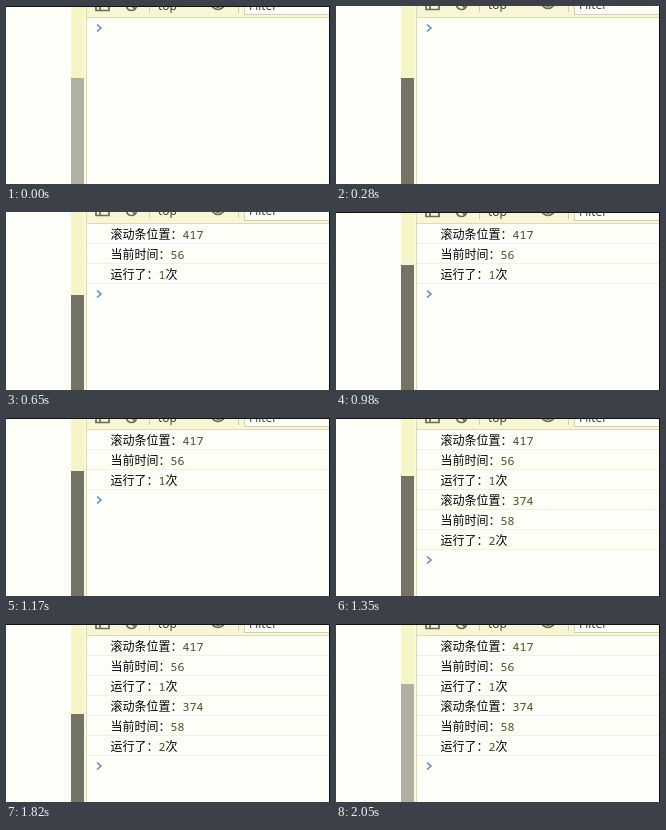
An HTML page for the animation above (2090 ms loop, 324 by 178 pixels).

```html
<!DOCTYPE html>
<html lang="zh-CN">
<head>
<meta charset="utf-8">
<title>Console</title>
<style>
html, body { margin: 0; width: 100%; height: 100%; overflow: hidden; background: #fffffa; }
svg { display: block; width: 324px; height: 178px; }
text { font-family: "Noto Sans CJK SC", "Noto Sans CJK", sans-serif; font-size: 12px; fill: #000; white-space: pre; }
.num { font-family: "Noto Sans Mono", "DejaVu Sans Mono", monospace; font-size: 11.6px; fill: #48481c; }
.bar { font-family: "Open Sans", "Noto Sans", sans-serif; font-size: 12px; fill: #34342a; }
.icon { fill: none; stroke: #69695a; stroke-width: 1.7; }
.rule { stroke: #f3f3cc; stroke-width: 1; }
</style>
</head>
<body>
<svg viewBox="0 0 324 178">
  <rect width="324" height="178" fill="#fffffa"/>
  <rect x="65" width="15" height="178" fill="#fafad8"/>
  <rect x="65" width="13" height="178" fill="#f5f5c8"/>
  <rect id="thumb" x="65" y="72" width="13" height="200"/>
  <path d="M80.5 0V178" stroke="#d9d9b4"/>

  <rect x="81" width="242" height="11" fill="#f7f7d6"/>
  <path d="M81 11.5H323" stroke="#dcdcae"/>
  <g id="tools">
    <path class="icon" d="M90 -7H103V4.5H90ZM94 -7V4.5M94 0H103"/>
    <circle class="icon" cx="125.5" cy="-.5" r="5"/>
    <path class="icon" d="M122 -4L129 3"/>
    <path d="M143.5 0V7M232.5 0V7" stroke="#cfcfad"/>
    <text class="bar" x="152" y="4">top</text>
    <path class="icon" d="M205 -1Q212 8 219 -1"/>
    <circle cx="212" cy="-1" r="3" fill="#69695a"/>
  </g>
  <rect x="238.5" y="-8.5" width="90" height="17" fill="#fffffa" stroke="#d2d2b2"/>
  <text id="filter" class="bar" x="243" y="4">Filter</text>

  <g id="logs"></g>
  <path id="prompt" d="M91 18.5L95 22L91 25.5" fill="none" stroke="#5f86bd" stroke-width="1.5"/>
  <path id="edge" d="M0 .5H323" stroke="#111"/>
  <path d="M323.5 0V178" stroke="#111"/>
</svg>
<script>
const LOOP = 2090, STEPS = 45, ROW = 20;
const PRESS = 3, RELEASE = 43;
const $ = id => document.getElementById(id);

// [step, top of the scrollbar thumb]
const path = [
  [0, 72], [6, 72], [9, 92], [12, 109], [13, 97], [14, 83], [17, 65],
  [21, 53], [25, 53], [29, 58], [31, 100], [33, 160], [35, 112],
  [36, 94], [38, 94], [39, 90], [42, 50], [44, 60]
];
const groups = [
  { at: 13, lines: [["滚动条位置：", "417", ""], ["当前时间：", "56", ""], ["运行了：", "1", "次"]] },
  { at: 26, lines: [["滚动条位置：", "374", ""], ["当前时间：", "58", ""], ["运行了：", "2", "次"]] }
];

groups.forEach((group, g) => {
  const rows = group.lines.map(([label, value, unit], i) => {
    const y = 27 + (g * 3 + i) * ROW;
    return `<text x="104.5" y="${y}">${label}<tspan class="num">${value}</tspan>${unit}</text>
      <path class="rule" d="M81 ${y + 4.5}H323"/>`;
  });
  $("logs").insertAdjacentHTML("beforeend", `<g>${rows.join("")}</g>`);
  group.node = $("logs").lastElementChild;
});

function thumbTop(step) {
  const i = path.findIndex(p => p[0] >= step);
  if (i <= 0) return path[0][1];
  const [s0, y0] = path[i - 1], [s1, y1] = path[i];
  return Math.round(y0 + (y1 - y0) * (step - s0) / (s1 - s0));
}

function draw() {
  const t = performance.now() % LOOP;
  const step = Math.min(STEPS - 1, Math.floor(t * STEPS / LOOP + 0.1));
  const held = step >= PRESS && step < RELEASE;
  const raised = step >= 1 && step < 18;

  $("thumb").setAttribute("y", thumbTop(step));
  $("thumb").setAttribute("fill", held ? "#747466" : "#b0b0a4");

  let shown = 0;
  for (const { at, node } of groups) {
    const on = step >= at;
    node.style.display = on ? "" : "none";
    if (on) shown += 3;
  }
  $("prompt").setAttribute("transform", `translate(0 ${shown * ROW})`);

  $("edge").style.display = raised ? "none" : "";
  for (const id of ["tools", "filter"])
    $(id).setAttribute("transform", `translate(0 ${raised ? -1 : 0})`);
  requestAnimationFrame(draw);
}
draw();
</script>
</body>
</html>
```
